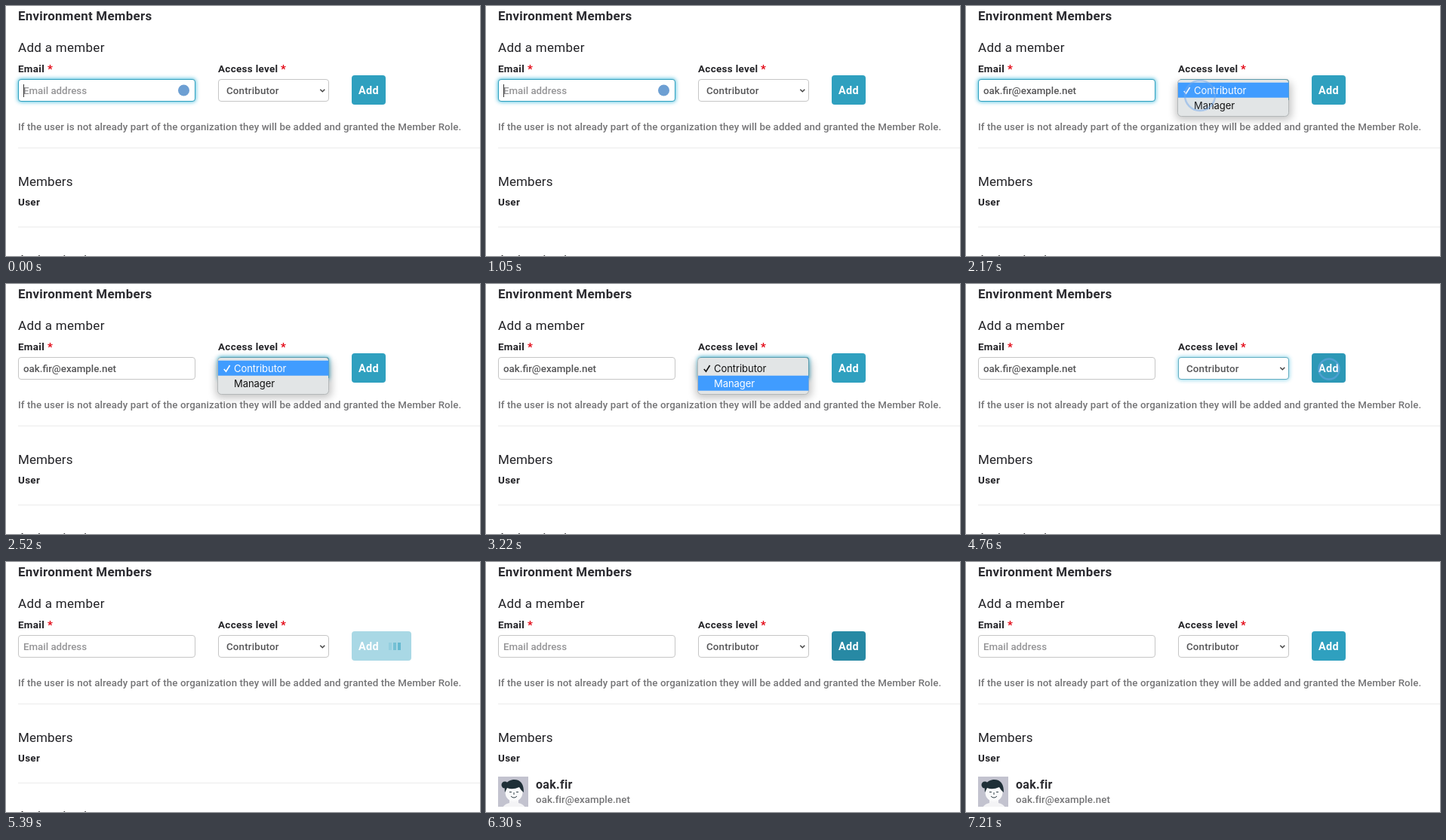
An HTML page for the animation above (7280 ms loop, 628 by 332 pixels).

```html
<!DOCTYPE html>
<html lang="en">
<head>
<meta charset="utf-8">
<title>Environment members</title>
<style>
  html, body { margin: 0; width: 100%; height: 100%; overflow: hidden; background: #fff; }
  svg { display: block; width: 628px; height: 332px; }
  text { font: 500 13.3px Roboto, "Open Sans", sans-serif; fill: #555557; white-space: pre; }
  .title { font-size: 16.9px; font-weight: 700; fill: #2b2b30; letter-spacing: .28px; }
  .section { font-size: 17px; font-weight: 400; fill: #222226; }
  .label { font-size: 13.4px; font-weight: 700; fill: #222226; letter-spacing: .33px; }
  .star { font-size: 15px; font-weight: 700; fill: #e30613; }
  .note { fill: #747476; letter-spacing: .08px; }
  .hint { fill: #949496; }
  .add { font-size: 14.4px; font-weight: 700; fill: #fff; letter-spacing: .4px; }
  .name { font-size: 16px; font-weight: 700; fill: #2b2b30; letter-spacing: .3px; }
  .item { font: 13px Inter, Roboto, sans-serif; letter-spacing: -.05px; }
  .box { fill: #fff; stroke: #c6c6c6; }
  .focus { fill: #fff; stroke: #2fa0bf; }
  .halo { fill: #2fb4d8; filter: url(#blur); }
  .rule { stroke: #ececec; }
</style>
</head>
<body>
<svg viewBox="0 0 628 332" xmlns="http://www.w3.org/2000/svg">
  <defs>
    <filter id="blur" x="-20%" y="-60%" width="140%" height="220%"><feGaussianBlur stdDeviation="2.6"/></filter>
    <filter id="haze" x="-20%" y="-60%" width="140%" height="220%"><feGaussianBlur stdDeviation="5.5"/></filter>
    <clipPath id="portrait"><rect x="16" y="285" width="40" height="40"/></clipPath>
  </defs>

  <text class="title" x="16" y="19">Environment Members</text>
  <text class="section" x="16" y="61" letter-spacing=".3">Add a member</text>
  <text class="label" x="16" y="88">Email</text>
  <text class="star" x="55" y="89">*</text>
  <text class="label" x="281" y="88">Access level</text>
  <text class="star" x="364" y="89">*</text>
  <text class="note" x="16" y="165">If the user is not already part of the organization they will be added and granted the Member Role.</text>
  <path class="rule" d="M16 188.5H628"/>
  <text class="section" x="16" y="239" letter-spacing=".1">Members</text>
  <text class="label" x="16" y="265">User</text>

  <rect class="box" x="16.5" y="97.5" width="234" height="29" rx="3.5"/>
  <g id="emailFocus">
    <rect class="halo" x="15" y="96" width="237" height="32" rx="5" opacity=".75"/>
    <rect class="focus" x="16.5" y="97.5" width="234" height="29" rx="3.5"/>
  </g>
  <text id="email" x="23" y="117"></text>
  <path id="caret" d="M23.5 104V121" stroke="#333"/>
  <circle id="badge" cx="235.5" cy="112" r="7.5" fill="#6d9fd3"/>

  <rect class="box" x="281.5" y="97.5" width="146" height="29" rx="3.5"/>
  <g id="selectFocus">
    <rect class="halo" x="280" y="96" width="149" height="32" rx="5" opacity=".75"/>
    <rect class="focus" x="281.5" y="97.5" width="146" height="29" rx="3.5"/>
  </g>
  <text x="292" y="117" letter-spacing=".18">Contributor</text>
  <path d="M416.3 110.8L419.3 113.8L422.3 110.8" fill="none" stroke="#444" stroke-width="1.5"/>

  <g id="menu">
    <rect x="278" y="101" width="153" height="50" rx="6" fill="#000" opacity=".24" filter="url(#haze)"/>
    <rect x="280.5" y="97.5" width="147" height="49" rx="5" fill="#e2e5e6" stroke="#b4b8b9"/>
    <path d="M284 97.5H424.5Q427.5 97.5 427.5 100.5V125" fill="none" stroke="#5d9cad"/>
    <rect id="highlight" x="281" width="146.5" height="20" fill="#409cff"/>
    <path id="check" d="M288.8 113L291.5 116.2L296.6 108" fill="none" stroke-width="1.6"/>
    <text class="item" id="first" x="302" y="117">Contributor</text>
    <text class="item" id="second" x="302" y="137">Manager</text>
  </g>

  <rect id="button" x="458" y="92" height="39" rx="4"/>
  <text class="add" x="467" y="117">Add</text>
  <g id="spinner" fill="#2fa0bf">
    <rect x="507" y="107" width="4" height="10"/>
    <rect x="513" y="107" width="4" height="10"/>
    <rect x="519" y="107" width="4" height="10"/>
  </g>

  <g id="footer">
    <path class="rule" d="M16 293.5H628"/>
    <text class="section" x="16" y="343.3">Authentication</text>
  </g>
  <g id="member">
    <g clip-path="url(#portrait)">
      <rect x="16" y="285" width="40" height="40" fill="#c3c3cf"/>
      <path d="M31 312H43V320Q49 321 52 326H22Q25 321 31 320Z" fill="#f4f4f6"/>
      <circle cx="25" cy="296" r="4.5" fill="#1f3038"/>
      <ellipse cx="37" cy="306" rx="11.5" ry="12" fill="#fafafb"/>
      <path d="M25 306Q23 291 36 289Q50 288 50 306Q46 303 44 299Q35 303 28 300Z" fill="#1f3038"/>
      <path d="M31 305.5h3M40 305.5h3M33 311q4 4 8 0M37 306v3" fill="none" stroke="#34434a"/>
    </g>
    <text class="name" x="66" y="301">oak.fir</text>
    <text class="note" x="66" y="320">oak.fir@example.net</text>
  </g>
  <circle id="ring" stroke="#72a8ec" stroke-width="2.5" fill="#8ab8f0" fill-opacity=".15"/>
</svg>

<script>
const LOOP = 7280, STEP = 70;
const ADDRESS = "oak.fir@example.net";
const TEAL = [47, 160, 191], HOVER = [39, 137, 164];
const clicks = [
  { at: 1960, x: 310, y: 119, r: 20 },
  { at: 4270, x: 363.5, y: 107, r: 18 },
  { at: 4760, x: 481, y: 113, r: 18 }
];
const $ = id => document.getElementById(id);
const ramp = (t, a, b) => Math.min(1, Math.max(0, (t - a) / (b - a)));
const within = (t, a, b) => t >= a && t < b;
const show = (id, on) => $(id).setAttribute("visibility", on ? "visible" : "hidden");
const set = (id, attrs) => {
  for (const key in attrs) $(id).setAttribute(key, attrs[key]);
};
const mix = (from, to, k) => `rgb(${from.map((v, i) => Math.round(v + (to[i] - v) * k))})`;

function drawForm(t) {
  const sent = t >= 5040;
  const count = sent ? 0 : Math.round(ramp(t, 1050, 1680) * ADDRESS.length);
  $("email").textContent = count ? ADDRESS.slice(0, count) : "Email address";
  $("email").setAttribute("class", count ? "" : "hint");
  show("caret", !count && t < 1120 && !within(t, 490, 770));
  show("badge", !count && t < 1120);
  set("emailFocus", { opacity: 1 - ramp(t, 2170, 2380) });
  set("selectFocus", { opacity: ramp(t, 2170, 2380) * (1 - ramp(t, 4690, 4900)) });
}

function drawMenu(t) {
  const onSecond = within(t, 2730, 4130);
  show("menu", within(t, 2030, 4620));
  set("highlight", { y: onSecond ? 121.7 : 101.7 });
  const firstInk = onSecond ? "#111" : "#fff";
  $("first").style.fill = firstInk;
  $("second").style.fill = onSecond ? "#fff" : "#111";
  set("check", { stroke: firstInk });
}

function drawButton(t) {
  const loading = within(t, 5040, 5740);
  const hover = ramp(t, 4690, 4900) * (1 - ramp(t, 6790, 7210));
  set("button", { width: loading ? 79 : 45, fill: loading ? "#a9d8e5" : mix(TEAL, HOVER, hover) });
  show("spinner", loading);
  [...$("spinner").children].forEach((bar, i) => {
    const wave = Math.cos(2 * Math.PI * ((t - 5390) / 840 + (2 - i) * .17));
    bar.setAttribute("opacity", .3 + .25 * wave);
  });
}

function drawRing(t) {
  const click = clicks.find(c => within(t, c.at, c.at + 350));
  show("ring", click);
  if (!click) return;
  const age = t - click.at;
  set("ring", {
    cx: click.x, cy: click.y,
    r: click.r * (.75 + .25 * ramp(age, 0, 140)),
    opacity: .5 * (1 - ramp(age, 210, 350))
  });
}

function draw(time) {
  const t = Math.floor(time % LOOP / STEP) * STEP;
  drawForm(t);
  drawMenu(t);
  drawButton(t);
  drawRing(t);
  show("member", t >= 5670);
  show("footer", t < 5670);
}

const start = performance.now();
function tick() {
  draw(performance.now() - start);
  requestAnimationFrame(tick);
}
tick();
</script>
</body>
</html>
```
